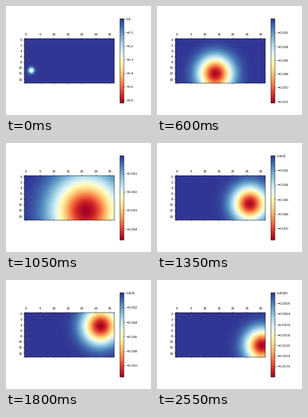
Recreate the animation shown at these times as a matplotlib script. Size 182 px wide and 137 px high, loop 2.7 s.

```python
import numpy as np
import matplotlib.pyplot as plt
from matplotlib.animation import FuncAnimation

W, H, DPI = 182, 137, 32
SCALE = 28.5 / DPI  # keeps the default layout proportions at this size

plt.rcParams.update({
    "font.family": "DejaVu Sans",
    "font.size": 10 * SCALE,
    "axes.linewidth": 1.2 * SCALE,
})
for axis in ("xtick", "ytick"):
    plt.rcParams.update({
        f"{axis}.major.size": 3.5 * SCALE,
        f"{axis}.major.pad": 3.5 * SCALE,
        f"{axis}.major.width": 1.2 * SCALE,
    })

ROWS, COLS = 16, 32
FRAMES, STEP_MS = 18, 150

# waypoints of the wandering estimate: step, x, y
PATH = np.array([
    (0, 2.0, 11.0), (2, 8.4, 10.9), (6, 19.1, 13.4), (9, 26.0, 9.7),
    (11, 26.0, 5.7), (14, 27.9, 2.1), (17, 30.3, 11.4),
])

# moments of rising uncertainty: step, extra spread, duration
PULSES = [(6.5, 4.7, 1.4), (11, 5.15, 0.6), (13.7, 3.5, 0.8)]

yy, xx = np.mgrid[:ROWS, :COLS]


def center(step):
    steps, xs, ys = PATH.T
    return np.interp(step, steps, xs), np.interp(step, steps, ys)


def spread(step):
    base = min(3.85, 0.5 + 1.4 * step)
    return base + sum(h * np.exp(-((step - t) / d) ** 2) for t, h, d in PULSES)


def belief(step):
    cx, cy = center(step)
    dist2 = (xx - cx) ** 2 + (yy - cy) ** 2
    p = np.exp(-dist2 / (2 * spread(step) ** 2))
    return p / p.sum()


fig = plt.figure(figsize=(W / DPI, H / DPI), dpi=DPI, facecolor="white")


def draw(step):
    fig.clear()
    fig.subplots_adjust(left=0.128)
    ax = fig.add_subplot()
    img = ax.matshow(-belief(step), cmap="RdYlBu", interpolation="bicubic")
    fig.colorbar(img, ax=ax)
    return []


anim = FuncAnimation(fig, draw, frames=FRAMES, interval=STEP_MS,
                     init_func=lambda: draw(0), repeat=True,
                     repeat_delay=0, blit=False)
plt.show()
```
